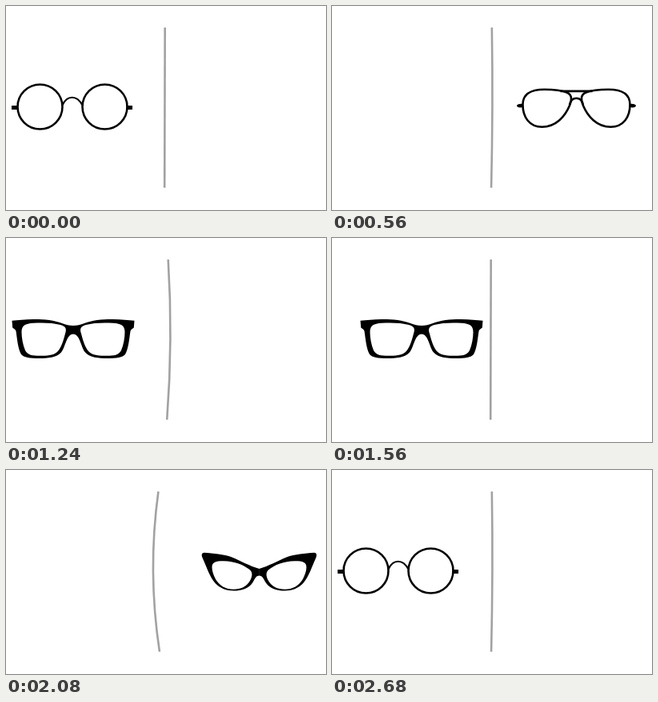
Recreate the animation shown at these times as an HTML page. Size 400 by 256 pixels, loop 2720 ms.

```html
<!DOCTYPE html>
<html lang="en">
<head>
<meta charset="utf-8">
<title>Glasses</title>
<style>
html, body { margin: 0; width: 100%; height: 100%; overflow: hidden; background: #fff; }
svg { display: block; width: 400px; height: 256px; }
.wire { fill: none; stroke: #000; stroke-width: 2.6; }
</style>
</head>
<body>
<svg viewBox="0 0 400 256">
  <defs>
    <clipPath id="clipL"><path id="areaL"/></clipPath>
    <clipPath id="clipR"><path id="areaR"/></clipPath>

    <g id="round">
      <g class="wire">
        <circle cx="-40" cy="126.5" r="28"/>
        <circle cx="41" cy="126.5" r="28"/>
        <path d="M-12 124.5C-6 111.5 6 111.5 13 124.5" stroke-width="2.2"/>
      </g>
      <path d="M-75.5 125h8v5h-8zM68 125h7.5v5H68z"/>
    </g>

    <g id="aviatorHalf">
      <path class="wire" d="M-67 124C-67 109-56 104.8-40 104.8C-28 104.8-18 106-12 108.5C-5 111-5.5 119-8.5 125C-14 138-25 151.7-43 151.7C-59 151.7-67 139-67 124Z"/>
      <path d="M-67 123C-71 122.3-74.5 123.5-74.5 125.2S-71 128-67 127Z"/>
    </g>
    <g id="aviator">
      <use href="#aviatorHalf"/>
      <use href="#aviatorHalf" transform="scale(-1 1)"/>
      <path class="wire" d="M-20 106.9H20M-8.5 124C-6 113 6 113 8.5 124"/>
    </g>

    <path id="squareHalf" fill-rule="evenodd" d="M.2 110C-5 110-9 109-14 107C-24 103-38 101.8-50 102C-60 102.2-69 103.3-76.5 103.8L-75.8 112.5C-74 114-72 114.5-71.5 117C-70 127-69 139-65 146C-62 150-54 151-43 151C-31 151-21 150-15 143.5C-9.5 137-8.5 120.5.2 120.5Z
      M-64.5 118C-64.5 110-60 107.5-50 106.8C-38 106-25 106.5-16 109C-9 111-8 114-10 120C-12 128-15 138-20 143C-25 147.5-33 147.8-42 147.8C-51 147.8-57 147-60 141C-63 134-64.5 125-64.5 118Z"/>
    <g id="square">
      <use href="#squareHalf"/>
      <use href="#squareHalf" transform="scale(-1 1)"/>
    </g>

    <path id="catHalf" fill-rule="evenodd" d="M.2 124C-12 120.5-23 114-34 109.5C-45 105.5-57 104.8-69 103.8C-72 104-72.3 107-71 110C-66 121-62 134-55 142C-49 148.5-41 151.5-32 151.5C-22 151.5-13 149-8 141C-5 136-4 132.5.2 132.5Z
      M-59 122C-59 115-53 114-44 114.2C-31 114.6-19 119-12 125C-8 128.5-8.5 133-11 138C-15 146-23 149.8-32 149.8C-42 149.8-50 145-54.5 137C-57 132-59 127-59 122Z"/>
    <g id="cat">
      <use href="#catHalf"/>
      <use href="#catHalf" transform="scale(-1 1)"/>
    </g>
  </defs>

  <g clip-path="url(#clipL)"><use id="left"/></g>
  <g clip-path="url(#clipR)"><use id="right"/></g>
  <path id="line" fill="none" stroke="#a2a2a2" stroke-width="2.6"/>
</svg>
<script>
const LOOP = 2720;
const el = id => document.getElementById(id);

const ease = {
  lin: u => u,
  in: u => u * u,
  soft: u => u * u * (3 - 2 * u),
  zip: u => u < .5 ? 4 * u ** 3 : 1 - 4 * (1 - u) ** 3
};

// time, centre of the glasses, easing towards it
const slide = [
  [0, 82.5], [400, 112, 'in'], [610, 316.5, 'zip'],
  [720, 316.5, 'lin'], [960, 287, 'in'], [1170, 84, 'zip'],
  [1280, 84, 'lin'], [1560, 112, 'soft'], [1640, 112, 'lin'], [1850, 316.5, 'zip'],
  [2080, 316.5, 'lin'], [2320, 281, 'in'], [2530, 82.5, 'zip'], [LOOP, 82.5, 'lin']
];

// time after a pass begins, bend of the line
const bendRight = [[0, 0], [120, 0], [160, 2], [240, 10], [340, 2], [440, -14.5], [500, 4], [550, 0]];
const bendLeft = [[0, 0], [120, 0], [160, -2], [220, -11], [280, 7], [320, -3], [360, 2], [400, 0]];
const passes = [[400, bendRight], [960, bendLeft], [1640, bendRight], [2320, bendLeft]];

function sample(keys, t, fallback) {
  const i = keys.findIndex(k => k[0] > t);
  if (i < 0) return keys[keys.length - 1][1];
  if (i === 0) return keys[0][1];
  const [t0, a] = keys[i - 1], [t1, b, name = fallback] = keys[i];
  return a + (b - a) * ease[name]((t - t0) / (t1 - t0));
}

function draw(t) {
  const x = sample(slide, t);
  const bend = passes.reduce((sum, [start, keys]) => sum + sample(keys, t - start, 'soft'), 0);
  const top = 198.7 + .57 * bend, bottom = 198.2 + .43 * bend, mid = 198.4 + 1.5 * bend;
  const curve = `${top} 27Q${mid} 127 ${bottom} 228`;

  el('line').setAttribute('d', 'M' + curve);
  el('areaL').setAttribute('d', `M-100 0H${top}L${curve}V256H-100Z`);
  el('areaR').setAttribute('d', `M500 0H${top}L${curve}V256H500Z`);

  el('left').setAttribute('href', t > 680 && t < 2040 ? '#square' : '#round');
  el('right').setAttribute('href', t < 1360 ? '#aviator' : '#cat');
  for (const id of ['left', 'right']) el(id).setAttribute('transform', `translate(${x})`);
}

const begin = performance.now();
function tick() {
  const t = (performance.now() - begin) % LOOP;
  draw(Math.floor(t / 40) * 40);
  requestAnimationFrame(tick);
}
tick();
</script>
</body>
</html>
```
